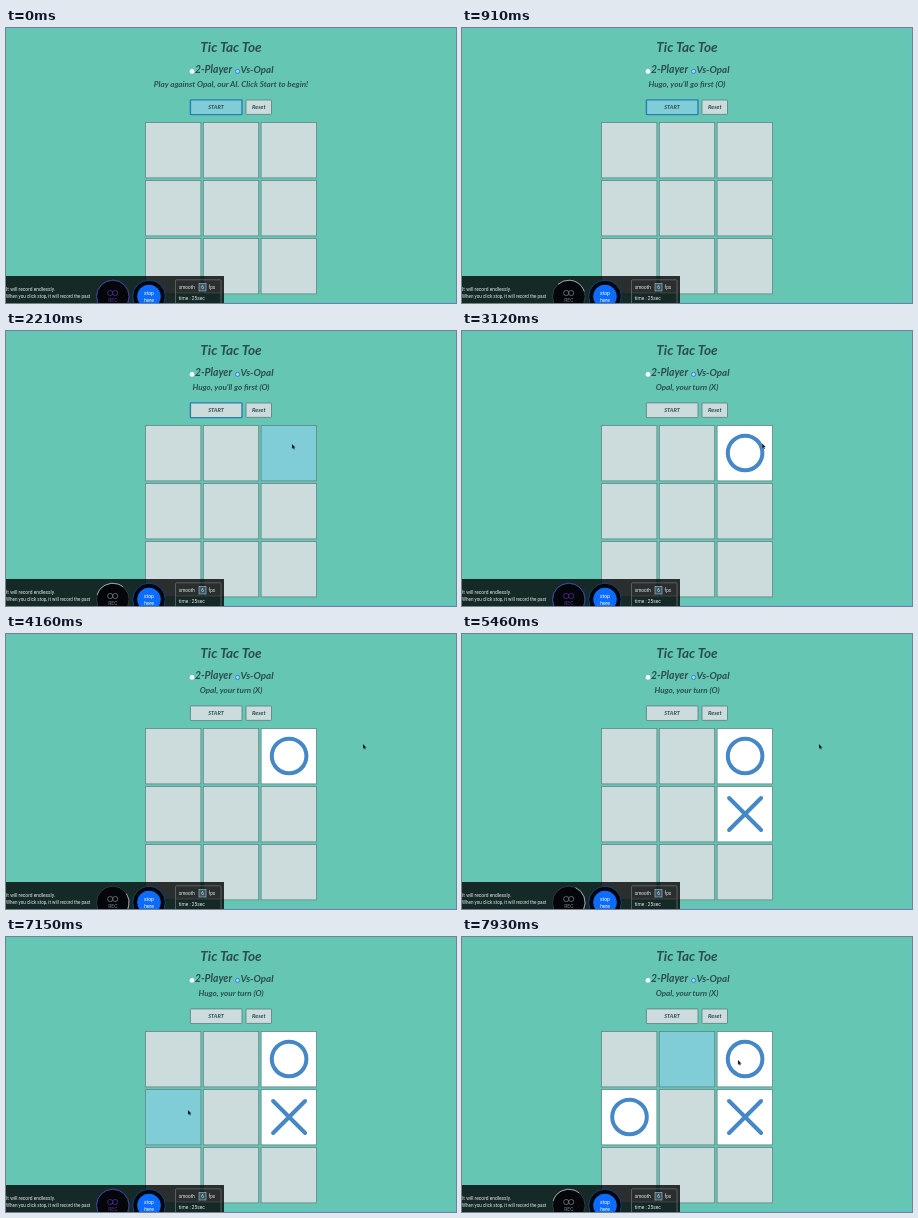
Write an HTML page that moves like this. It is 450x275 px and loops after 8000 ms.

```html
<!DOCTYPE html>
<html lang="en">
<head>
<meta charset="utf-8">
<title>Tic Tac Toe</title>
<style>
html, body { margin: 0; width: 100%; height: 100%; overflow: hidden; background: #65c6b3; }
svg { display: block; width: 100%; height: 100%; }
.game { font-family: Lato, "Open Sans", sans-serif; font-style: italic; font-weight: 700; fill: #2c4d50; text-anchor: middle; }
.panel { font-family: Roboto, Inter, sans-serif; fill: #e3e8ea; }
.mark { fill: none; stroke: #4688c5; stroke-width: 4; stroke-linecap: round; }
</style>
</head>
<body>
<svg id="stage" viewBox="0 0 450 275">
  <rect width="450" height="275" fill="#65c6b3"/>
  <path d="M0 .5H449.5V274.5" fill="none" stroke="#5cc5c6"/>
  <path d="M218 274.5H450" stroke="#5abfd8"/>
  <g class="game">
    <text x="225" y="23.8" font-size="13.6">Tic Tac Toe</text>
    <text x="207.5" y="45" font-size="10.4">2-Player</text>
    <text x="251" y="45" font-size="9.8">Vs-Opal</text>
    <text id="message" x="225" y="59.2" font-size="8.1"></text>
    <rect id="start" x="184.4" y="71.9" width="51.6" height="14.7" rx=".6"/>
    <rect x="240" y="72" width="25.5" height="14.4" rx=".6" fill="#ccdbdb" stroke="#587c80" stroke-width=".8"/>
    <text x="210" y="81" font-size="5.6">START</text>
    <text x="252.8" y="81" font-size="5.9">Reset</text>
  </g>
  <circle cx="186" cy="43.4" r="2.4" fill="#fff"/>
  <circle cx="231.6" cy="43.4" r="2.1" fill="#a9d7ee" stroke="#2a83d8" stroke-width="1"/>
  <g id="board"></g>
  <g class="panel">
    <rect y="248" width="218" height="27" fill="#000" fill-opacity=".79"/>
    <text x="0" y="263" font-size="4.9">It will record endlessly.</text>
    <text x="0" y="270" font-size="4.55">When you click stop, it will record the past</text>
    <circle cx="106.8" cy="268.5" r="16.3" fill="#04060a" stroke="#39434d" stroke-width=".8"/>
    <circle id="ring" cx="106.8" cy="268.5" r="16.3" fill="none" stroke-width=".8"/>
    <g id="rec" fill="none" stroke-width=".8">
      <rect x="101.8" y="262.6" width="4.8" height="4.8" rx="1.8"/>
      <rect x="106.8" y="262.6" width="4.8" height="4.8" rx="1.8"/>
      <text id="label" x="106.8" y="274" font-size="5" stroke="none" text-anchor="middle">REC</text>
    </g>
    <circle cx="143" cy="268.5" r="16.3" fill="#02060b" stroke="#0f4a8c" stroke-width=".9"/>
    <circle cx="143" cy="268.5" r="11.8" fill="#0b6cff"/>
    <g font-size="5" text-anchor="middle" fill="#fff">
      <text x="143" y="267.3">stop</text>
      <text x="143" y="273.8">here</text>
    </g>
    <rect x="169.5" y="251.8" width="45.5" height="28" rx="1" fill="none" stroke="#68757a" stroke-width=".7"/>
    <text x="172.8" y="261" font-size="4.7">smooth</text>
    <rect x="193" y="255.5" width="7" height="7.5" fill="#3b5560" stroke="#8fb4bf" stroke-width=".7"/>
    <text x="195.2" y="261" font-size="4.7">6</text>
    <text x="202.5" y="261" font-size="4.7">fps</text>
    <path d="M170 265H215" stroke="#4a5659" stroke-width=".6"/>
    <text x="172.8" y="271.5" font-size="4.8">time : 25sec</text>
  </g>
  <path id="cursor" d="M0 0V4.8L1.1 3.8L1.9 5.5L2.7 5.1L2 3.5H3.4Z" fill="#0c1518" stroke="#6d8588" stroke-width=".25"/>
</svg>
<script>
const LOOP = 8000, STEP = 130;
const IDLE = '#ccdbdb', HOVER = '#80cdd7';
const SIZE = 55.4;
const $ = id => document.getElementById(id);

const messages = [
  [0, 'Play against Opal, our AI. Click Start to begin!'],
  [520, "Hugo, you'll go first (O)"],
  [2860, 'Opal, your turn (X)'],
  [4940, 'Hugo, your turn (O)'],
  [7410, 'Opal, your turn (X)']
];
const moves = [
  { at: 2860, cell: 2, kind: 'O' },
  { at: 4940, cell: 5, kind: 'X' },
  { at: 7410, cell: 3, kind: 'O' }
];
// Pointer path: time, x, y
const path = [
  [0, 212, 80], [1300, 212, 80], [1690, 236, 97], [2080, 286, 113],
  [2990, 286, 113], [3640, 357, 110], [5590, 357, 110], [6110, 255, 146],
  [6630, 182, 173], [7410, 182, 173], [7540, 186, 166], [7670, 202, 147],
  [7800, 236, 137], [7930, 276, 123], [8000, 276, 123]
];

function add(parent, tag, attrs) {
  const el = document.createElementNS('http://www.w3.org/2000/svg', tag);
  set(el, attrs);
  parent.append(el);
  return el;
}
function set(el, attrs) {
  for (const key in attrs) el.setAttribute(key, attrs[key]);
}

const origin = i => [139.5 + 57.8 * (i % 3), 94.5 + 58 * Math.floor(i / 3)];
const cells = Array.from({ length: 9 }, (_, i) => {
  const [x, y] = origin(i);
  return add($('board'), 'rect', { x, y, width: SIZE, height: SIZE, stroke: '#628589', 'stroke-width': 0.8 });
});
for (const move of moves) {
  const [x, y] = origin(move.cell);
  const cx = x + 28, cy = y + 27.5;
  move.el = move.kind === 'O'
    ? add($('board'), 'circle', { class: 'mark', cx, cy, r: 17.3 })
    : add($('board'), 'path', { class: 'mark', d: `M${cx - 16} ${cy - 16}l32 32m0-32l-32 32` });
}

function pointer(t) {
  t = Math.max(0, t);
  const i = path.findIndex(p => p[0] > t);
  const [t0, x0, y0] = path[i - 1], [t1, x1, y1] = path[i];
  const k = (t - t0) / (t1 - t0);
  return [x0 + (x1 - x0) * k, y0 + (y1 - y0) * k];
}
const inside = ([px, py], x, y, w, h) => px >= x && px <= x + w && py >= y && py <= y + h;

function draw(time) {
  const t = Math.floor(time / STEP) * STEP;
  const text = messages.filter(m => m[0] <= t).pop()[1];
  if ($('message').textContent !== text) $('message').textContent = text;

  // Hover colours trail the pointer by one step.
  const trail = pointer(t - STEP);
  const focused = t < 2860;
  set($('start'), {
    fill: inside(trail, 184, 72, 52, 14) ? HOVER : IDLE,
    stroke: focused ? '#277faf' : '#587c80',
    'stroke-width': focused ? 1.4 : 0.8
  });
  const taken = moves.filter(m => m.at <= t).map(m => m.cell);
  cells.forEach((cell, i) => {
    const over = inside(trail, ...origin(i), SIZE, SIZE);
    set(cell, { fill: taken.includes(i) ? '#fff' : over ? HOVER : IDLE });
  });
  for (const m of moves) m.el.style.display = m.at <= t ? '' : 'none';

  const [x, y] = pointer(t);
  set($('cursor'), { transform: `translate(${x} ${y})` });
  $('cursor').style.display = t > 1300 ? '' : 'none';

  const phase = t % 1430 / 1430, lit = phase < 0.4;
  const tint = lit ? '#56309a' : '#778087';
  set($('rec'), { stroke: tint });
  set($('label'), { fill: tint });
  set($('ring'), {
    stroke: lit ? '#3e43c4' : '#a9b4bd',
    'stroke-dasharray': lit ? 'none' : '32 71',
    transform: `rotate(${phase * 360} 106.8 268.5)`
  });
}

const begin = performance.now();
function tick() {
  draw((performance.now() - begin) % LOOP);
  requestAnimationFrame(tick);
}
tick();
</script>
</body>
</html>
```
